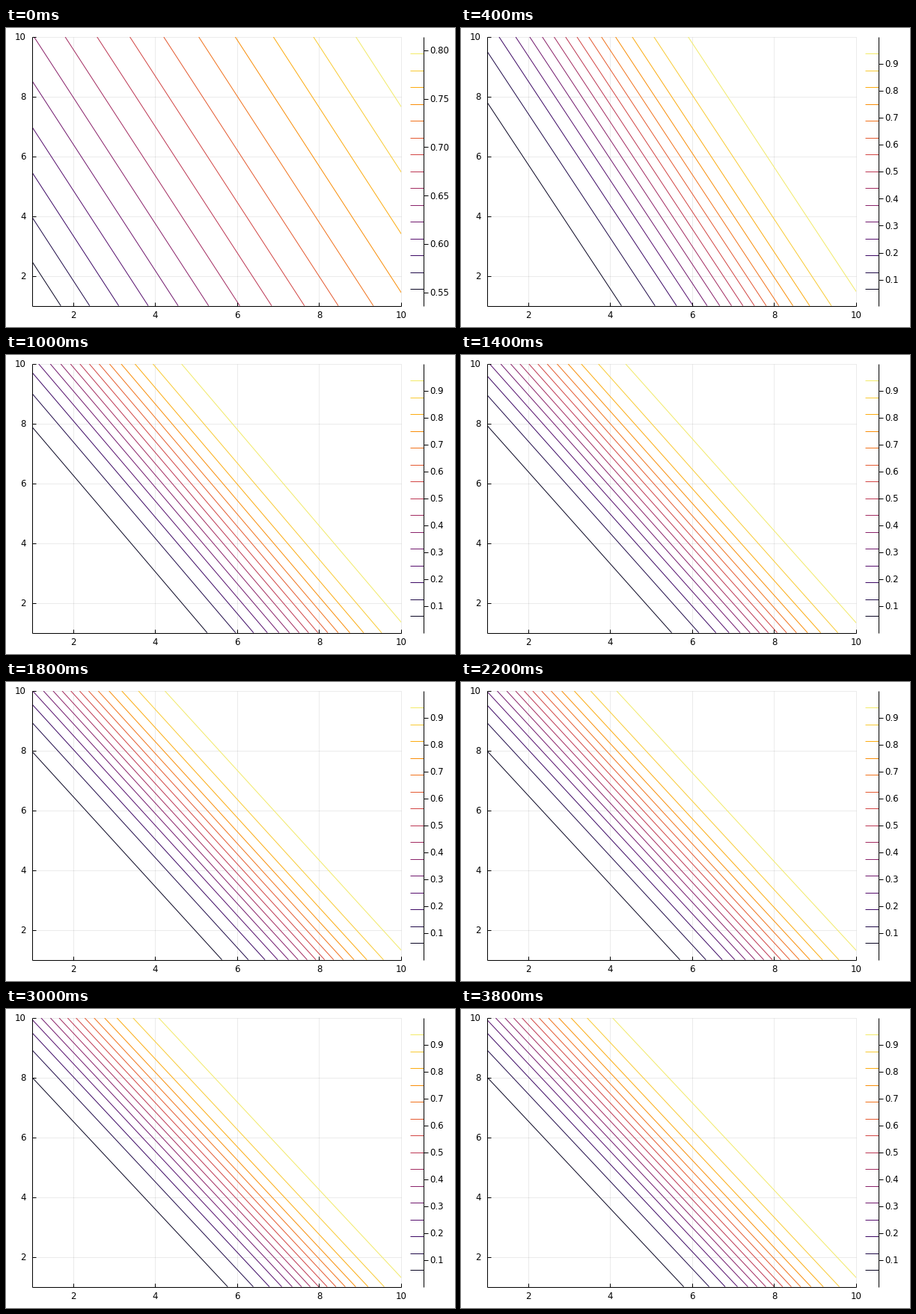
These frames come from a looping animation (600 by 400 pixels, 4000 ms). A matplotlib script:

```python
import numpy as np
import matplotlib.pyplot as plt
from matplotlib.animation import FuncAnimation
from matplotlib.patches import Rectangle

W, H, DPI = 600, 400, 100
PX = 72 / DPI                                 # one pixel in points
LEFT, RIGHT, TOP, BOTTOM = 35, 528, 12, 371.6
BAR_L, BAR_R = 540, 558.4
FRAMES, INTERVAL = 20, 200
LEVELS = 15
FONT = 11.8
MAX_TICKS = 10

plt.rcParams["font.family"] = "DejaVu Sans"
fig = plt.figure(figsize=(W / DPI, H / DPI), dpi=DPI, facecolor="white")
ax = fig.add_axes([0, 0, 1, 1])
ax.set_xlim(0, W)
ax.set_ylim(H, 0)
ax.axis("off")


def px(x):
    return LEFT + (x - 1) / 9 * (RIGHT - LEFT)


def py(y):
    return BOTTOM - (y - 1) / 9 * (BOTTOM - TOP)


def stroke(xs, ys, color="black", z=3, **kw):
    return ax.plot(xs, ys, color=color, lw=PX, zorder=z,
                   solid_capstyle="butt", **kw)[0]


def label(x, y, text, ha):
    return ax.text(x, y + 0.365 * FONT, text, ha=ha, va="baseline",
                   fontsize=FONT * PX, zorder=4)


def sigmoid(s):
    return 1 / (1 + np.exp(-s))


def logit(p):
    return np.log(p / (1 - p))


def weights(step):
    """Logistic model (w1, w2, bias) while training converges."""
    if step == 0:
        return 0.1002, 0.0474, -0.002
    rate, c, start = 0.25, 0.00676, 10.69 ** 2
    q = start / (rate + c * start) * np.exp(-2 * rate * step)
    d = np.sqrt(rate * q / (1 - c * q))       # distance left for the bias
    return 1.229 - 0.0883 * d, 0.842 - 0.1041 * d - 0.0013 * d * d, d - 10.685


# Grid, axes and their labels
for v in range(2, 11, 2):
    stroke([px(v)] * 2, [TOP, BOTTOM], z=1, alpha=0.08)
    stroke([LEFT, RIGHT], [py(v)] * 2, z=1, alpha=0.08)
    stroke([px(v)] * 2, [BOTTOM, BOTTOM - 4.5])
    stroke([LEFT, LEFT + 4.5], [py(v)] * 2)
    label(px(v), 383.5, str(v), "center")
    label(26.7, py(v), str(v), "right")
stroke([LEFT, LEFT], [TOP, BOTTOM])
stroke([LEFT, RIGHT], [BOTTOM, BOTTOM])
stroke([BAR_R, BAR_R], [TOP, BOTTOM])

# Contours and colour bar
area = Rectangle((LEFT, TOP), RIGHT - LEFT, BOTTOM - TOP,
                 transform=ax.transData)
contours = []
for k in range(1, LEVELS + 1):
    f = k / (LEVELS + 1)
    color = plt.cm.inferno(f)
    line = stroke([], [], color, z=2)
    line.set_clip_path(area)
    contours.append(line)
    stroke([BAR_L, BAR_R], [BOTTOM - f * (BOTTOM - TOP)] * 2, color, z=2)

ticks = [(stroke([], []), label(566, 0, "", "left")) for _ in range(MAX_TICKS)]


def update(step):
    w1, w2, b = weights(step)
    lo, hi = sigmoid(w1 + w2 + b), sigmoid(10 * (w1 + w2) + b)

    ends = np.array([1, 10])
    levels = np.linspace(lo, hi, LEVELS + 2)[1:-1]
    for line, level in zip(contours, levels):
        line.set_data(px((logit(level) - b - w2 * ends) / w1), py(ends))

    gap, digits = (0.05, 2) if hi - lo < 0.4 else (0.1, 1)
    values = np.arange(np.ceil(lo / gap), np.floor(hi / gap) + 1) * gap
    for i, (mark, text) in enumerate(ticks):
        shown = i < len(values)
        mark.set_visible(shown)
        text.set_visible(shown)
        if shown:
            y = BOTTOM - (values[i] - lo) / (hi - lo) * (BOTTOM - TOP)
            mark.set_data([BAR_R, BAR_R + 6], [y, y])
            text.set_y(y + 0.365 * FONT)
            text.set_text(f"{values[i]:.{digits}f}")
    return contours


anim = FuncAnimation(fig, update, frames=FRAMES, interval=INTERVAL,
                     repeat=True, repeat_delay=0, blit=False)
plt.show()
```
